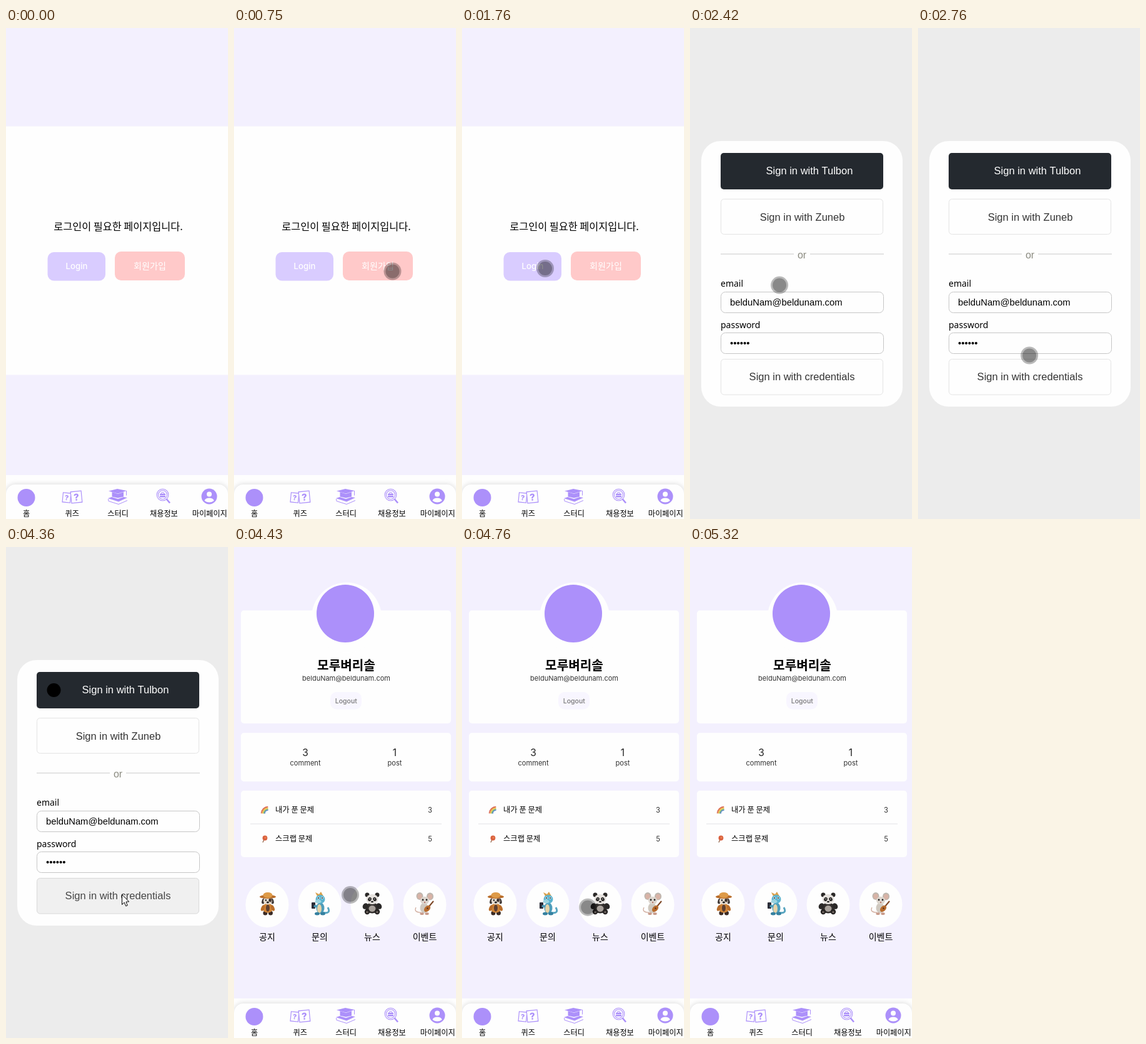
An HTML page with a canvas for the animation above (6.12 s loop, 355 by 782 pixels).

```html
<!DOCTYPE html>
<html lang="ko">
<head>
<meta charset="utf-8">
<title>Login flow</title>
<style>
  html, body { margin: 0; width: 100%; height: 100%; overflow: hidden; background: #fefefe; }
  canvas { display: block; width: 355px; height: 782px; }
</style>
</head>
<body>
<canvas id="stage"></canvas>
<script>
const W = 355, H = 782, LOOP = 6120;
const KO = '"Noto Sans CJK KR", "Noto Sans CJK JP", "Noto Sans CJK", sans-serif';
const UI = 'Inter, "Noto Sans", sans-serif';
const ARIAL = '"Liberation Sans", Arial, sans-serif';
const PURPLE = '#ac90fa', LAVENDER = '#f3f0fe', WHITE = '#fefefe';
const MAIL = 'belduNam@beldunam.com';

const canvas = document.getElementById('stage');
const ctx = canvas.getContext('2d');
const dpr = window.devicePixelRatio || 1;
canvas.width = W * dpr;
canvas.height = H * dpr;

// ---------- drawing helpers ----------
function rect(x, y, w, h, color) {
  ctx.fillStyle = color;
  ctx.fillRect(x, y, w, h);
}

function box(x, y, w, h, r, fill, line) {
  ctx.beginPath();
  ctx.roundRect(x, y, w, h, r);
  if (fill) { ctx.fillStyle = fill; ctx.fill(); }
  if (line) { ctx.strokeStyle = line; ctx.lineWidth = 1; ctx.stroke(); }
}

function oval(x, y, rx, ry, color, turn = 0) {
  ctx.beginPath();
  ctx.ellipse(x, y, rx, ry, turn, 0, Math.PI * 2);
  ctx.fillStyle = color;
  ctx.fill();
}

const dot = (x, y, r, color) => oval(x, y, r, r, color);

function path(points, fill, line, width = 1) {
  ctx.beginPath();
  points.forEach(([x, y], i) => i ? ctx.lineTo(x, y) : ctx.moveTo(x, y));
  if (fill) { ctx.closePath(); ctx.fillStyle = fill; ctx.fill(); }
  if (line) { ctx.strokeStyle = line; ctx.lineWidth = width; ctx.stroke(); }
}

function bend(x0, y0, cx, cy, x1, y1, color, width) {
  ctx.beginPath();
  ctx.moveTo(x0, y0);
  ctx.quadraticCurveTo(cx, cy, x1, y1);
  ctx.strokeStyle = color;
  ctx.lineWidth = width;
  ctx.stroke();
}

function text(str, x, y, size, family, color, align = 'center', weight = 400) {
  ctx.font = `${weight} ${size}px ${family}`;
  ctx.textAlign = align;
  ctx.fillStyle = color;
  ctx.fillText(str, x, y);
}

const hangul = (str, x, y, size, color = '#000', align = 'center') =>
  text(str, x, y, size, KO, color, align, 300);

// ---------- navigation bar ----------
function quizCard(x, y, w, h, turn, size) {
  ctx.save();
  ctx.translate(x, y);
  ctx.rotate(turn);
  ctx.lineWidth = 1.2;
  ctx.strokeStyle = PURPLE;
  ctx.fillStyle = WHITE;
  ctx.fillRect(-w / 2, -h / 2, w, h);
  ctx.strokeRect(-w / 2, -h / 2, w, h);
  text('?', 0, size * 0.37, size, UI, PURPLE, 'center', 800);
  ctx.restore();
}

function capIcon() {
  path([[164, 737.5], [178, 734], [193, 737], [179, 741.5]], PURPLE);
  path([[169.5, 739], [179, 742], [188, 739], [188, 746.5], [179, 748.5], [169.5, 746.5]], PURPLE);
  path([[192.5, 737], [192.5, 744.5]], null, PURPLE, 1);
  path([[163, 749], [169, 747], [179, 750], [188, 747], [194, 748], [180, 754.5]], PURPLE);
  path([[163.5, 750], [164, 753.5], [180, 758.5], [194, 752.5]], null, PURPLE, 1);
}

function searchIcon() {
  ctx.strokeStyle = PURPLE;
  ctx.lineWidth = 1.1;
  for (const r of [9.3, 7]) {
    ctx.beginPath();
    ctx.arc(250.5, 743.5, r, 0, Math.PI * 2);
    ctx.stroke();
  }
  box(246, 741.5, 9, 6, 1, PURPLE);
  box(248.5, 739.5, 4, 3, 1, null, PURPLE);
  rect(246, 744, 9, 0.8, WHITE);
  path([[256.5, 750], [262, 756.5]], null, PURPLE, 2.6);
}

function personIcon() {
  dot(325, 746, 12.5, PURPLE);
  dot(325, 742.5, 4, WHITE);
  ctx.beginPath();
  ctx.ellipse(325, 753, 7.5, 4.5, 0, Math.PI, 0);
  ctx.quadraticCurveTo(325, 758, 317.5, 753);
  ctx.fillStyle = WHITE;
  ctx.fill();
}

function navBar() {
  ctx.save();
  ctx.shadowColor = 'rgba(0,0,0,.16)';
  ctx.shadowBlur = 9 * dpr;
  box(0, 727, W, 70, 15, WHITE);
  ctx.restore();
  dot(32.5, 748, 14, PURPLE);
  quizCard(97, 748, 12.5, 15, 0.1, 11);
  quizCard(112.5, 747, 17, 18, -0.1, 15);
  capIcon();
  searchIcon();
  personIcon();
  ['홈', '퀴즈', '스터디', '채용정보', '마이페이지'].forEach((label, i) =>
    hangul(label, 32.5 + i * 73.3, 777.5, 12.2));
}

// ---------- pages ----------
function gatePage(t) {
  rect(0, 0, W, H, WHITE);
  rect(0, 0, W, 156.5, LAVENDER);
  rect(0, 552.5, W, 159.5, LAVENDER);
  hangul('로그인이 필요한 페이지입니다.', 179.5, 322, 16.3);
  box(66.5, 357, 92.5, 45.5, 10, '#d9ccff');
  text('Login', 113, 384, 13.2, UI, '#fff', 'center', 500);
  box(174, 356, 112, 46, 10, '#ffc9c9');
  hangul('회원가입', 230, 384, 14.1, '#fff');
  if (t >= 1820 && t < 2020) box(66.5, 357, 92.5, 45.5, 10, `rgba(0,0,0,${t < 1950 ? 0.16 : 0.08})`);
  navBar();
}

function formPage(t) {
  const ready = t >= 2830;
  rect(0, 0, W, H, '#ececec');
  box(18, 180, 322, 423, 31, WHITE);
  box(49, 199, 260, 58, 5, '#24292f');
  if (ready) dot(76.5, 228, 11, '#000');
  text('Sign in with Tulbon', 191, 233, 16.5, ARIAL, '#fff');
  box(49.5, 272.5, 259, 56, 5, WHITE, '#e4e4e4');
  text('Sign in with Zuneb', 179.5, 307, 16.5, ARIAL, '#333');
  rect(49, 359, 117, 2, '#e3e3e3');
  rect(192, 359, 118, 2, '#e3e3e3');
  text('or', 179, 367, 16, ARIAL, '#8b8b80');
  text('email', 49, 412, 14, '"Noto Sans", sans-serif', '#000', 'left');
  text('password', 49, 478, 14, '"Noto Sans", sans-serif', '#000', 'left');
  box(49.5, 420.5, 260, 33, 7, WHITE, '#c6c6c6');
  text(MAIL, 64, 442, 14.8, ARIAL, '#000', 'left');
  box(49.5, 485.5, 260, 33, 7, WHITE, '#c6c6c6');
  text('••••••', 64, 507, 15, ARIAL, '#000', 'left');
  box(49.5, 527.5, 259, 56.5, 5, ready ? '#f0f0f0' : WHITE, ready ? '#d9d9d9' : '#e4e4e4');
  text('Sign in with credentials', 179, 561, 16.5, ARIAL, t >= 3300 ? '#464646' : '#333');
}

function rainbow() {
  ['#d9604f', '#e59a45', '#ecd05a', '#6aae78', '#5a87c9'].forEach((color, i) => {
    ctx.beginPath();
    ctx.arc(55, 425, 11.5 - i * 1.4, Math.PI * 1.02, Math.PI * 1.48);
    ctx.strokeStyle = color;
    ctx.lineWidth = 1.5;
    ctx.stroke();
  });
}

function lollipop() {
  path([[48.5, 465], [46, 470.5]], null, '#8a5a3c', 1.2);
  dot(49.5, 463.5, 3.9, '#d9603f');
  dot(50.2, 462.8, 1.6, '#e8804f');
}

function puppy() {
  oval(50, 583, 3.5, 3.5, '#3b2b25');
  oval(58.5, 583, 3.5, 3.5, '#3b2b25');
  oval(54, 575, 8.5, 7.5, '#cf8437');
  oval(54, 575, 3, 5.5, '#5e4032');
  oval(46, 575, 2.5, 5, '#b96d2a', 0.4);
  oval(62, 575, 2.5, 5, '#b96d2a', -0.4);
  oval(47, 564, 2.5, 4.5, '#3f3836', 0.3);
  oval(61, 564, 2.5, 4.5, '#3f3836', -0.3);
  oval(54, 563.5, 7, 6, '#e6dcd0');
  oval(58, 562.5, 2.5, 3, '#5b4a42');
  oval(54, 557, 13, 3, '#b96d2a');
  oval(54, 554.5, 7.5, 4.5, '#dd9a48');
  dot(51, 562.5, 1.3, '#222');
  dot(57, 562.5, 1.3, '#222');
  oval(54, 566, 2, 1.4, '#222');
}

function dragon() {
  bend(141, 582, 156, 585, 150, 574, '#58a5c0', 3);
  path([[133, 556], [130, 550], [136, 553], [139, 549], [143, 556]], '#d9a04c');
  oval(138, 575, 6.5, 9, '#4f9dba');
  oval(136.5, 576, 3.5, 7, '#e6d3a8');
  oval(133, 584, 4, 2.5, '#35809f');
  oval(142, 584, 4, 2.5, '#35809f');
  oval(138, 561, 7.5, 7, '#5bb3cf');
  oval(134.5, 564.5, 5, 3, '#9cd4e0');
  dot(135, 559, 1.8, '#fff');
  dot(141, 559, 1.8, '#fff');
  dot(135, 559, 1.1, '#222');
  dot(141, 559, 1.1, '#222');
  box(124, 566, 6, 10, 1, '#2b2d38');
  oval(130.5, 572, 3, 2, '#4f9dba');
}

function panda() {
  dot(213, 554, 3.5, '#2b2928');
  dot(229, 554, 3.5, '#2b2928');
  oval(221, 575, 11, 8.5, '#34302e');
  oval(221, 576, 5.5, 5, '#a8a19b');
  oval(210, 572, 4, 5, '#2b2928', 0.6);
  oval(232, 572, 4, 5, '#2b2928', -0.6);
  dot(213, 581, 4.2, '#262322');
  dot(229, 581, 4.2, '#262322');
  dot(213, 581.5, 1.8, '#6b625d');
  dot(229, 581.5, 1.8, '#6b625d');
  oval(221, 561, 9.5, 8, '#e6e2de');
  oval(217, 561, 2.7, 3.2, '#2b2928', 0.5);
  oval(225, 561, 2.7, 3.2, '#2b2928', -0.5);
  dot(217.3, 560.5, 0.7, '#fff');
  dot(224.7, 560.5, 0.7, '#fff');
  oval(221, 565, 2, 1.3, '#222');
}

function mouse() {
  bend(299, 582, 287, 582, 291, 574, '#cfab9c', 1.3);
  oval(297, 556, 5.5, 6, '#bdb6ae');
  oval(313.5, 556.5, 5.5, 6, '#bdb6ae');
  oval(297, 556.5, 3.7, 4.2, '#d8b3a6');
  oval(313.5, 557, 3.7, 4.2, '#d8b3a6');
  oval(304, 575, 6.5, 8, '#cfc8bf');
  oval(300.5, 584, 3.2, 2, '#c99c8c');
  oval(308.5, 584, 3.2, 2, '#c99c8c');
  oval(305, 563, 7, 6.3, '#ddd6ce');
  dot(302, 562, 1.4, '#222');
  dot(308, 562, 1.4, '#222');
  dot(305, 566, 1.2, '#b87a6c');
  path([[308, 577], [319, 564]], null, '#7c4524', 2);
  oval(309, 576, 6, 4, '#b86c2e', -0.8);
  dot(309.5, 575.5, 1.4, '#6d3a1c');
}

function homePage() {
  rect(0, 0, W, H, LAVENDER);
  rect(0, 719, W, 63, WHITE);
  box(11, 101, 336, 180, 5, WHITE);
  box(11, 296, 336, 77.5, 5, WHITE);
  box(11, 388, 336, 106, 5, WHITE);
  dot(180, 112.5, 56, WHITE);
  dot(178, 106, 46, PURPLE);
  text('모루벼리솔', 179.5, 195.5, 20.2, KO, '#000', 'center', 700);
  text(MAIL, 179.5, 213, 11, UI, '#333');
  box(154, 231, 50, 27.5, 10, '#f8f6ff');
  text('Logout', 179.3, 249, 10.5, UI, '#777', 'center', 500);
  text('3', 114, 333, 15.5, UI, '#222');
  text('comment', 114, 348, 11.1, UI, '#333');
  text('1', 257, 333, 15.5, UI, '#222');
  text('post', 257, 348, 11.1, UI, '#333');
  rainbow();
  hangul('내가 푼 문제', 66, 423, 12.3, '#000', 'left');
  text('3', 313.5, 423, 11.2, UI, '#333');
  rect(26, 440, 306, 2, '#f0f0f2');
  lollipop();
  hangul('스크랩 문제', 66, 469, 12.3, '#000', 'left');
  text('5', 313.5, 469, 11.2, UI, '#333');
  ['공지', '문의', '뉴스', '이벤트'].forEach((label, i) => {
    const x = 53 + i * 84;
    oval(x, 569.5, 34.5, 36.5, WHITE);
    hangul(label, x, 626, 14);
  });
  puppy();
  dragon();
  panda();
  mouse();
  navBar();
}

// ---------- pointer ----------
// Progress 0..1 between two times, moving in n equal jumps.
function jumps(t, start, end, n) {
  const i = Math.floor((t - start) / (end - start) * (n - 1) + 0.08);
  return Math.min(1, Math.max(0, i / (n - 1)));
}

const mix = (a, b, u) => a + (b - a) * u;

function curve(a, b, c, u) {
  return [0, 1].map(k => mix(mix(a[k], b[k], u), mix(b[k], c[k], u), u));
}

const smooth = u => u * u * (3 - 2 * u);

function pointer(t) {
  if (t < 130 || t >= 5320) return null;
  if (t < 750) {
    const u = jumps(t, 130, 680, 9);
    return curve([341, 772], [215, 400], [253.5, 387.5], 1 - (1 - u) ** 1.6);
  }
  if (t < 1200) return [253.5, 387.5];
  if (t < 2350) {
    const u = smooth(mix(0.08, 1, jumps(t, 1200, 1760, 9)));
    return [mix(253.5, 133, u), mix(387.5, 383, u)];
  }
  if (t < 2970) {
    const u = jumps(t, 2350, 2900, 9);
    return curve([133, 383], [167, 470], [185, 550], 1 - (1 - u) ** 1.25);
  }
  if (t < 4360) return [186, t < 3030 ? 552 : 554];
  if (t < 4980) {
    const u = jumps(t, 4360, 4900, 9) ** 3.7;
    return [mix(186, 230, u), mix(554, 611, u)];
  }
  const u = jumps(t, 4980, 5250, 5);
  return [mix(245, 317, u), mix(637, 774, u)];
}

function arrow(x, y) {
  ctx.save();
  ctx.translate(x, y);
  path([[0, 0], [0, 16], [3.7, 12.6], [6.2, 18.4], [8.8, 17.3], [6.4, 11.7], [11.2, 11.4]], '#fff', '#000');
  ctx.restore();
}

function drawPointer(t) {
  if (t >= 3370 && t < 4430) return arrow(185.5, 553.5);
  const at = pointer(t);
  if (!at) return;
  const pressed = (t >= 1820 && t < 1950) || (t >= 3230 && t < 3370);
  dot(...at, 14, 'rgba(0,0,0,.27)');
  dot(...at, 11, `rgba(0,0,0,${pressed ? 0.38 : 0.26})`);
}

function frame(now) {
  const t = now % LOOP;
  ctx.setTransform(dpr, 0, 0, dpr, 0, 0);
  if (t < 2350) gatePage(t);
  else if (t < 4430) formPage(t);
  else homePage();
  drawPointer(t);
}

const begin = performance.now();
function tick() {
  frame(performance.now() - begin);
  requestAnimationFrame(tick);
}
tick();
</script>
</body>
</html>
```
